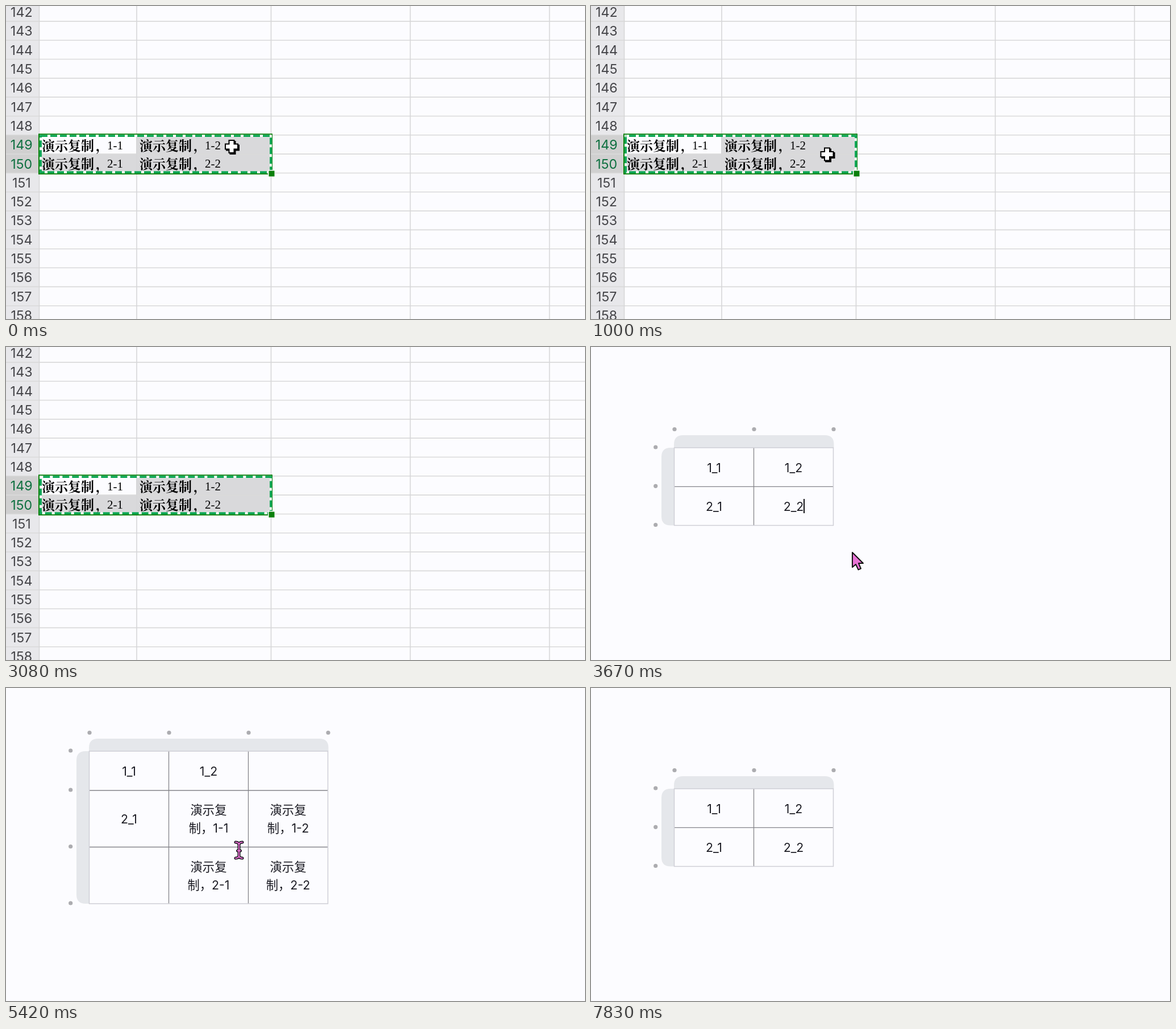
Recreate the animation shown at these times as an HTML page. Size 1019 px wide and 550 px high, loop 8000 ms.

```html
<!DOCTYPE html>
<html lang="zh-CN">
<head>
<meta charset="utf-8">
<style>
html, body { margin: 0; width: 100%; height: 100%; overflow: hidden; background: #fcfcff; }
svg { display: block; width: 1019px; height: 550px; }
.num { font: 23.3px Inter, sans-serif; fill: #444448; text-anchor: middle; }
.num.on { fill: #0e7040; }
.han { font: 600 23px "Noto Serif CJK SC", "Noto Sans CJK SC", serif; }
.serif { font: 21px "Liberation Serif", serif; }
.cell { font: 21.3px Inter, "Noto Sans CJK SC", sans-serif; fill: #1a1a22; text-anchor: middle; }
</style>
</head>
<body>
<svg viewBox="0 0 1019 550">
  <g id="sheet"></g>
  <g id="small"></g>
  <g id="big"></g>
  <rect id="caret" width="2" height="25" fill="#101014"/>
  <g id="cross" stroke="#000" stroke-width="2">
    <path d="M-2.5-9h9v6.5h6.5v9h-6.5v6.5h-9v-6.5h-6.5v-9h6.5z"/>
    <path d="M-4.5-11h9v6.5h6.5v9h-6.5v6.5h-9v-6.5h-6.5v-9h6.5z" fill="#fff"/>
  </g>
  <path id="arrow" d="M0 0V26L6 21L10.5 30.5L15 28.5L11 19H19Z" fill="#e873d4" stroke="#111" stroke-width="2" stroke-linejoin="round"/>
  <g id="beam" fill="none" stroke-linecap="round"></g>
</svg>
<script>
const LOOP = 8000, STEP = 1000 / 12;
const $ = id => document.getElementById(id);

const rect = (x, y, w, h, fill, more = '') =>
  `<rect x="${x}" y="${y}" width="${w}" height="${h}" fill="${fill}" ${more}/>`;
const text = (x, y, s, cls) => `<text x="${x}" y="${y}" class="${cls}">${s}</text>`;
const line = (x1, y1, x2, y2, color, w) =>
  `<path d="M${x1} ${y1}L${x2} ${y2}" stroke="${color}" stroke-width="${w}"/>`;

function buildSheet() {
  const pitch = 33.32, rowY = n => 226.8 + (n - 149) * pitch;
  let s = rect(0, 0, 58, 550, '#e8e8eb') + rect(0, rowY(149), 58, 2 * pitch, '#d0d0d0');
  s += rect(59, 227, 408, 67, '#d9d9db') + rect(60, 228, 169, 32, '#fcfcff');
  for (let n = 142; n <= 158; n++) {
    const y = rowY(n), on = n === 149 || n === 150;
    s += line(0, y + pitch, 1019, y + pitch, '#dadada', 1.6);
    s += text(27.3, y + 25.4, n, on ? 'num on' : 'num');
  }
  for (const x of [58.5, 230, 466.5, 711.5, 956.5]) s += line(x, 0, x, 550, '#d6d6d8', 1.6);
  for (const row of [1, 2]) for (const col of [1, 2]) {
    const x = col === 1 ? 63 : 235, y = row === 1 ? 254 : 286;
    s += text(x, y, '演示复制<tspan dx="3">，</tspan>', 'han');
    s += text(x + 115, y - 2.5, `${row}-${col}`, 'serif');
  }
  s += rect(58, 225.3, 410, 69.7, 'none', 'stroke="#0b800b" stroke-width="2"');
  const ring = (color, more = '') =>
    rect(61, 228.2, 405, 64, 'none', `stroke="${color}" stroke-width="3.8" ${more}`);
  s += ring('#fff') + ring('#0aa552', 'id="ants" stroke-dasharray="12 5"');
  return s + rect(461, 288, 12, 12, '#fcfcff') + rect(462.5, 289.5, 10, 10, '#0b800b');
}

// rows: list of row edges; cells: [column, baseline, text]
function buildTable(rows, cols, cells) {
  const left = 146.5, top = rows[0], end = cols * 140 + left, bottom = rows[rows.length - 1];
  const xs = Array.from({ length: cols + 1 }, (_, i) => left + i * 140);
  const dot = (x, y) => `<circle cx="${x}" cy="${y}" r="3.6" fill="#acacb0"/>`;
  let s = `<path fill="#e5e7eb" d="M146 ${top}v-6q0-16 16-16H${end - 15}q16 0 16 16v6z
    M146 ${top}h-6q-16 0-16 16V${bottom - 16}q0 16 16 16h6z"/>`;
  s += rect(left, top, end - left, bottom - top, '#fcfcff');
  for (const x of xs.slice(1, -1)) s += line(x, top, x, bottom, '#85858a', 1.3);
  for (const y of rows.slice(1, -1)) s += line(left, y, end, y, '#85858a', 1.3);
  s += rect(left, top, end - left, bottom - top, 'none', 'stroke="#cfcfd6" stroke-width="1.5"');
  for (const x of xs) s += dot(x + .5, top - 32.5);
  for (const y of rows) s += dot(113.7, y - 1);
  for (const [c, y, t] of cells) s += text(216.5 + c * 140, y, t, 'cell');
  return s;
}

const pasted = [];
for (const row of [1, 2]) for (const col of [1, 2]) {
  const y = 122 + row * 100;
  pasted.push([col, y, '演示复'], [col, y + 31.5, `制，${row}-${col}`]);
}
$('sheet').innerHTML = buildSheet();
$('small').innerHTML = buildTable([177, 245.3, 313.5], 2,
  [[0, 219.5, '1_1'], [1, 219.5, '1_2'], [0, 287.5, '2_1'], [1, 287.5, '2_2']]);
$('big').innerHTML = buildTable([111, 180, 279.5, 379], 3,
  [[0, 153.5, '1_1'], [1, 153.5, '1_2'], [0, 237.5, '2_1'], ...pasted]);

const beam = 'M-6-14Q0-14 0-9Q0-14 6-14M0-9V9M-6 14Q0 14 0 9Q0 14 6 14M-2.5 1H2.5';
$('beam').innerHTML = `<path d="${beam}" stroke="#15101a" stroke-width="5"/>
  <path d="${beam}" stroke="#e873d4" stroke-width="2"/>`;

// pointer stops: [time, x, y]
const onSheet = [[80, 397, 247], [1000, 415.5, 260.5], [1330, 416, 261], [2170, 874, 493]];
const onTable = [[3250, 880, 525], [3660, 460, 361], [4080, 411, 287], [4250, 410, 285],
  [6170, 410, 285], [6910, 755, 357], [7170, 772, 400], [7420, 772, 400], [7750, 881, 522]];

function along(stops, t) {
  const i = stops.findIndex(p => p[0] > t);
  if (i < 1) return stops[i ? stops.length - 1 : 0].slice(1);
  const [t0, x0, y0] = stops[i - 1], [t1, x1, y1] = stops[i];
  const k = (t - t0) / (t1 - t0), ease = k * k * (3 - 2 * k);
  return [x0 + (x1 - x0) * ease, y0 + (y1 - y0) * ease];
}

const show = (id, on) => { $(id).style.display = on ? '' : 'none'; };
const within = (t, spans) => spans.some(([a, b]) => t >= a && t < b);
const caretOn = [[3660, 4160], [4740, 5410], [5910, 6410], [6910, 7660]];

function draw(now) {
  const t = Math.floor((now % LOOP + 6) / STEP) * STEP;
  const sheet = t < 3200, big = within(t, [[4910, 7160]]);
  show('sheet', sheet);
  show('small', !sheet && !big);
  show('big', big);
  $('ants').setAttribute('stroke-dashoffset', -t * .04 % 17);

  show('caret', within(t, caretOn));
  $('caret').setAttribute('x', big ? 534 : 374);
  $('caret').setAttribute('y', big ? 332.5 : 267);

  const [x, y] = along(sheet ? onSheet : onTable, t);
  const overTable = x < (big ? 567 : 427) && y < (big ? 379 : 313);
  const pointer = sheet ? t < 2240 && 'cross' : t < 7820 && (overTable ? 'beam' : 'arrow');
  for (const id of ['cross', 'beam', 'arrow']) show(id, id === pointer);
  if (pointer) $(pointer).setAttribute('transform', `translate(${x} ${y})`);
}

const start = performance.now();
(function tick() {
  draw(performance.now() - start);
  requestAnimationFrame(tick);
})();
</script>
</body>
</html>
```
